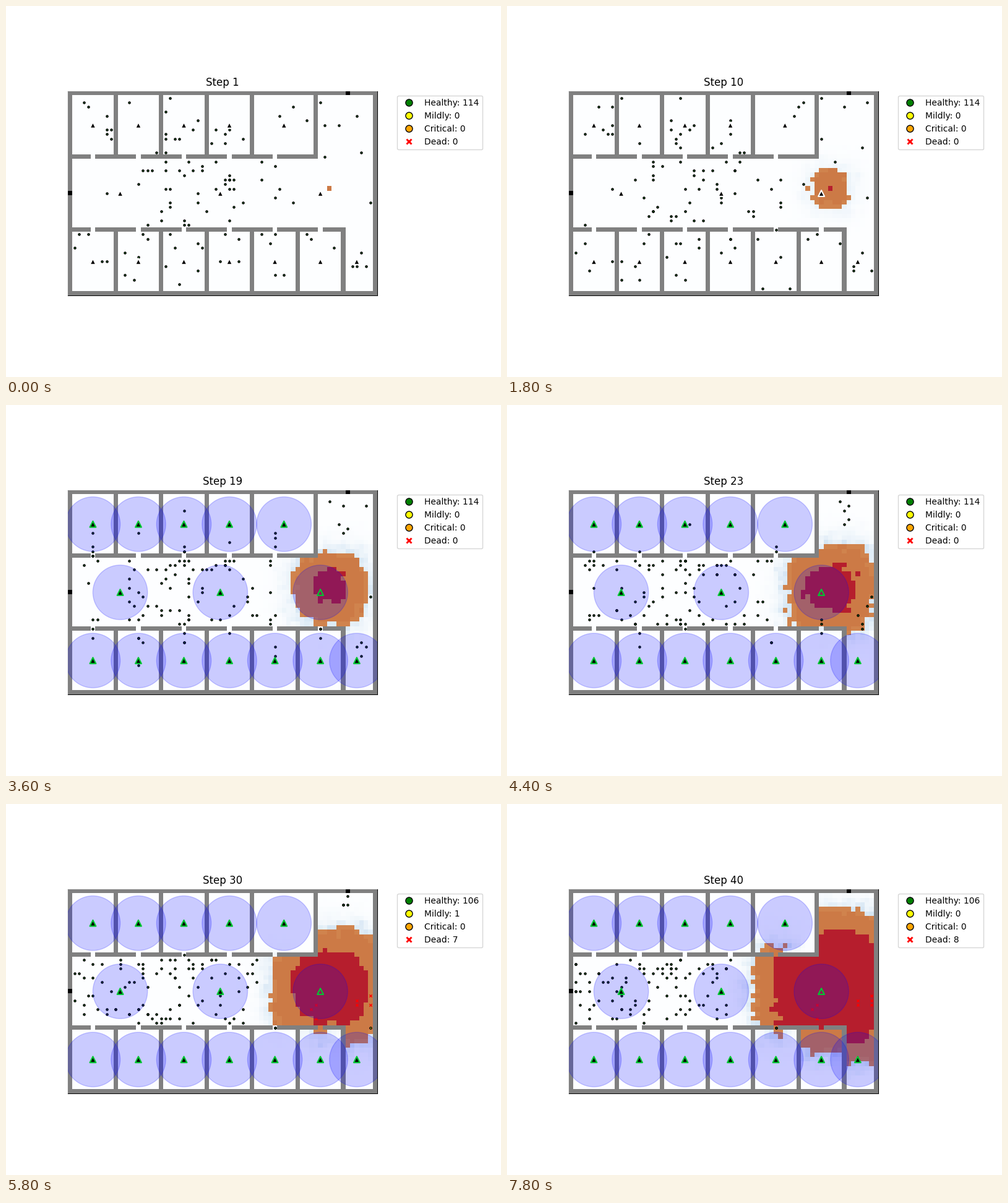
A matplotlib script for the animation above (8 s loop, 800 px wide and 600 px high).

```python
import random

import matplotlib.pyplot as plt
import numpy as np
from matplotlib.animation import FuncAnimation
from matplotlib.lines import Line2D
from matplotlib.patches import Circle

W, H = 68, 45
STEPS = 40
ALARM = 12
TOTAL = 114
FIRE = (57, 21)
SPEED = 0.43          # fire cells per step
BURN = 11             # steps from first flame to full heat
EXITS = [(0, 22), (61, 0)]

SIRENS = ([(x, 7) for x in (5, 15, 25, 35, 47)]
          + [(x, 22) for x in (11, 33, 55)]
          + [(x, 37) for x in (5, 15, 25, 35, 45, 55, 63)])

FLOOR = np.array([253, 254, 255])
SMOKE = np.array([212, 229, 243])
FLAME = np.array([204, 122, 70])
FRESH = np.array([208, 131, 77])
HOT = np.array([182, 30, 45])
GREY = np.array([128, 128, 128])

rng = random.Random(11)
noise_rng = np.random.default_rng(5)


def build_walls():
    wall = np.zeros((H, W), bool)
    wall[[0, -1], :] = True
    wall[:, [0, -1]] = True
    wall[14, :55] = True
    wall[30, :61] = True
    wall[:15, [10, 20, 30, 40, 54]] = True
    wall[30:, [10, 20, 30, 40, 50, 60]] = True
    wall[14, 5:46:10] = False
    wall[30, 5:56:10] = False
    for x, y in EXITS:
        wall[y, x] = False
    return wall


def gap(x0, y0, x1, y1):
    return (np.abs(x1 - x0) ** 3 + np.abs(y1 - y0) ** 3) ** (1 / 3)


def build_arrival(wall):
    """Step at which the flames reach each cell."""
    yy, xx = np.mgrid[:H, :W].astype(float)
    dist = gap(*FIRE, xx, yy)
    top = (yy <= 14) & (xx <= 54)
    low = (yy >= 30) & (xx <= 60)
    dist[top | low] = np.inf
    for dx, dy, x0, x1, room in [(45, 14, 41, 53, top),
                                 (45, 30, 41, 49, low),
                                 (55, 30, 51, 59, low)]:
        inside = room & (xx >= x0) & (xx <= x1)
        dist[inside] = gap(*FIRE, dx, dy) + 2.3 + gap(dx, dy, xx, yy)[inside]
    raw = noise_rng.normal(0, 0.9, (H, W))
    near = sum(np.roll(raw, s, a) for s in (-1, 1) for a in (0, 1)) / 4
    arrive = np.maximum((dist + 0.5 * raw + 0.5 * near) / SPEED, 2)
    arrive[FIRE[1], FIRE[0]] = 0
    arrive[wall] = np.inf
    hot = arrive + BURN
    hot[FIRE[1], FIRE[0]] = 9
    return arrive, hot


WALL = build_walls()
ARRIVE, HEAT = build_arrival(WALL)


def floor_plan(step):
    haze = np.exp(-np.maximum(ARRIVE - step, 0) / 3.5)[..., None]
    img = FLOOR + (SMOKE - FLOOR) * haze * min(1, (step - 1) / 20)
    img[ARRIVE <= step] = FRESH
    img[(ARRIVE <= step - 2) | (ARRIVE == 0)] = FLAME
    img[HEAT <= step] = HOT
    img[WALL] = GREY
    for x, y in EXITS:
        img[y, x] = 0
    return img.round().astype(np.uint8)


def sign(v):
    return (v > 0) - (v < 0)


def wobble():
    return rng.choice((-1, 0, 1))


def is_free(x, y, step):
    return (0 <= x < W and 0 <= y < H and not WALL[y, x]
            and ARRIVE[y, x] > step + 1)


def plan(x, y):
    """Goal cell and chance of heading for it."""
    door = min(x // 10 * 10 + 5, 45)
    if x >= 55 and y < 30:
        return EXITS[1], 0.35
    if y < 15 and x < 54:
        return (door, 15 if x == door else 13), 0.85
    if y >= 30:
        return (door, 29 if x == door else 31), 0.85
    return (0, 22 if x < 5 else y + wobble()), 0.36


def walk(pos, step):
    x, y = pos
    dx, dy = wobble(), wobble()
    if step >= ALARM:
        (gx, gy), eager = plan(x, y)
        if ARRIVE[y, x] <= step + 10:
            eager = 1
        if rng.random() < eager:
            dx, dy = sign(gx - x), sign(gy - y)
        if 15 <= y <= 29 and x < 55:
            dy = min(max(y + dy, 15), 29) - y
    for nx, ny in ((x + dx, y + dy), (x + dx, y), (x, y + dy)):
        if is_free(nx, ny, step):
            return nx, ny
    return pos


def first_crowd():
    crowd = []

    def fill(count, x0, x1, y0, y1):
        for _ in range(count):
            crowd.append((rng.randint(x0, x1), rng.randint(y0, y1)))

    for k, count in enumerate((7, 2, 9, 7)):
        fill(count, 10 * k + 1, 10 * k + 9, 1, 13)
    fill(3, 41, 53, 2, 12)
    fill(6, 55, 66, 1, 14)
    for k, count in enumerate((5, 6, 7, 4, 5)):
        fill(count, 10 * k + 1, 10 * k + 9, 31, 42)
    while len(crowd) < 106:
        x = round(rng.gauss(33, 13))
        if 1 <= x <= 50:
            crowd.append((x, rng.randint(15, 29)))
    return crowd


def simulate():
    crowd = first_crowd()
    history = [crowd]
    for step in range(2, STEPS + 1):
        crowd = [walk(p, step) for p in crowd]
        if step > ALARM:
            crowd = [p for p in crowd if p not in EXITS]
        history.append(crowd)
    return history


# start, place at step 23, last place, step of death
TRAPPED = [
    ((52, 31), (55, 28), (54, 25), 26),
    ((53, 31), (55, 29), (53, 26), 27),
    ((58, 33), (55, 31), (54, 28), 29),
    ((65, 23), (66, 23), (66, 23), 28),
    ((62, 38), (65, 25), (66, 25), 27),
    ((61, 37), (63, 27), (63, 24), 25),
    ((65, 38), (64, 29), (63, 25), 26),
    ((63, 34), (64, 30), (66, 24), 38),
]
MILD_FROM = 28


def between(a, b, f):
    """Sideways first, then up or down."""
    fx, fy = min(1, 2 * f), max(0, 2 * f - 1)
    return (round(a[0] + (b[0] - a[0]) * fx),
            round(a[1] + (b[1] - a[1]) * fy))


def trapped_at(k, step):
    start, mid, end, death = TRAPPED[k]
    if step < ALARM:
        r = random.Random(100 * k + step)
        return start[0] + r.randint(0, 1), start[1] + r.randint(0, 1)
    if step <= 23:
        return between(start, mid, (step - ALARM) / (23 - ALARM))
    return between(mid, end, min(1, (step - 23) / (death - 23)))


CROWD = simulate()

fig, ax = plt.subplots(figsize=(8, 6), dpi=100)
fig.subplots_adjust(right=0.75)
plan_img = ax.imshow(floor_plan(1), zorder=3, interpolation="nearest")
ax.set_xticks([])
ax.set_yticks([])
title = ax.set_title("Step 1")


def dots(color):
    return ax.scatter([], [], s=5, c=color, edgecolors="black",
                      linewidths=1, zorder=4)


healthy_dots = dots("green")
mild_dots = dots("yellow")
dead_marks = ax.scatter([], [], s=9, c="red", marker="x", linewidths=1,
                        zorder=4)

zones = [ax.add_patch(Circle(c, 6, color="blue", alpha=0.2, zorder=5))
         for c in SIRENS]
sirens = ax.scatter(*zip(*SIRENS), s=50, marker="^", c="black",
                    edgecolors="white", linewidths=1.5, zorder=6)
ax.set_xlim(-0.5, W - 0.5)
ax.set_ylim(H - 0.5, -0.5)

keys = [Line2D([], [], color="w", marker="o", markersize=8,
               markerfacecolor=c, markeredgecolor="black")
        for c in ("green", "yellow", "orange")]
keys.append(Line2D([], [], color="w", marker="X", markersize=8,
                   markerfacecolor="red"))


def labels(healthy, mild, dead):
    return [f"Healthy: {healthy}", f"Mildly: {mild}", "Critical: 0",
            f"Dead: {dead}"]


legend = ax.legend(keys, labels(TOTAL, 0, 0), loc="upper left",
                   bbox_to_anchor=(1.05, 1))


def place(marks, points):
    marks.set_offsets(np.array(points, float).reshape(-1, 2))


def draw(frame):
    step = frame + 1
    well, mild, dead = list(CROWD[frame]), [], []
    last = len(TRAPPED) - 1
    for k, person in enumerate(TRAPPED):
        if step >= person[3]:
            group = dead
        elif k == last and step >= MILD_FROM:
            group = mild
        else:
            group = well
        group.append(trapped_at(k, step))
    place(healthy_dots, well)
    place(mild_dots, mild)
    place(dead_marks, dead)

    alarm = step >= ALARM
    for zone in zones:
        zone.set_visible(alarm)
    sirens.set_edgecolor("#00c832" if alarm else "white")
    sirens.set_facecolor(["none" if HEAT[y, x] <= step else "black"
                          for x, y in SIRENS])

    plan_img.set_data(floor_plan(step))
    title.set_text(f"Step {step}")
    counts = labels(TOTAL - len(mild) - len(dead), len(mild), len(dead))
    for text, label in zip(legend.get_texts(), counts):
        text.set_text(label)
    return []


anim = FuncAnimation(fig, draw, frames=STEPS, interval=200, repeat=True,
                     repeat_delay=0)
plt.show()
```
